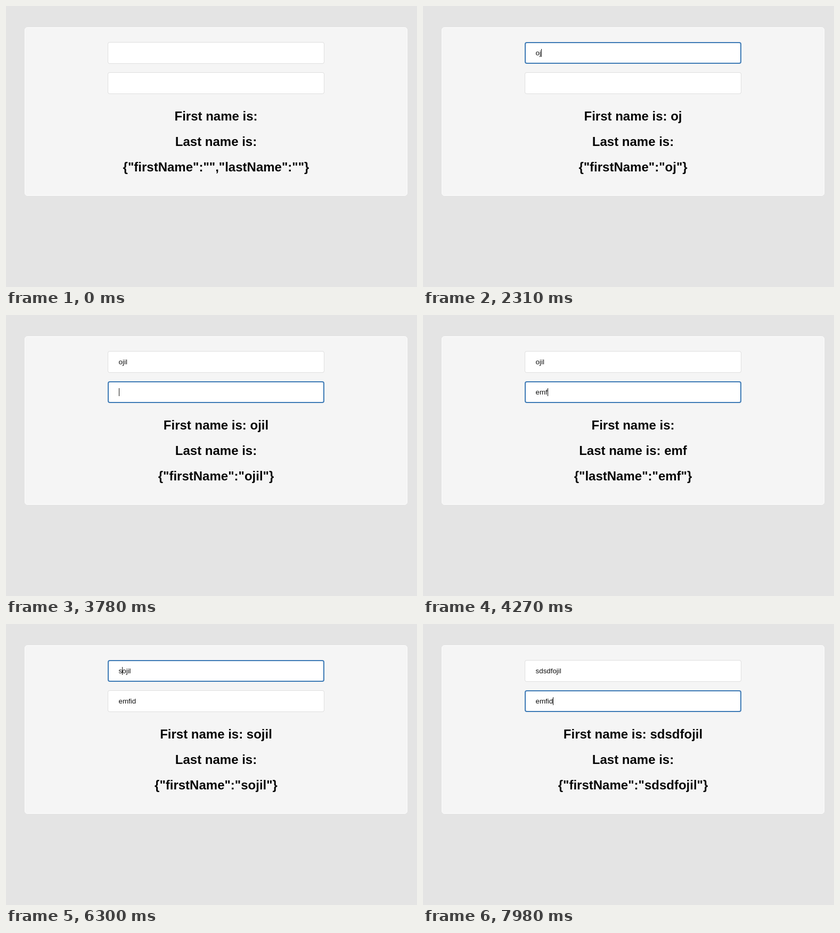
Animation, 772 px wide and 530 px high, one loop 8 s. Source, as an HTML page:

```html
<!DOCTYPE html>
<html lang="en">
<head>
<meta charset="utf-8">
<title>Name form</title>
<style>
html, body {
  margin: 0;
  width: 100%;
  height: 100%;
  overflow: hidden;
  background: #e4e4e4;
  font-family: "Liberation Sans", Arial, sans-serif;
}
body { position: relative; }
div { position: absolute; box-sizing: border-box; white-space: pre; }
.card {
  left: 35px; top: 40px; width: 719px; height: 318px;
  background: #f5f5f5;
  border: 1.5px solid #fdfdfd;
  border-radius: 5px;
}
.field {
  left: 191px; width: 407px; height: 41px;
  background: #fff;
  border-radius: 4px;
  box-shadow: inset 0 0 0 1px #dfdfdf;
}
.field.focus { box-shadow: inset 0 0 0 2px #3d7ab5; }
.value {
  left: 20.6px; top: 13px;
  font-size: 13.333px; line-height: 15px;
  color: #111;
}
.caret { position: relative; }
.caret::after {
  content: "";
  position: absolute;
  left: 0; top: 0;
  width: 1px; height: 15px;
  background: #111;
}
.line {
  left: 35px; width: 719px;
  text-align: center;
  font-weight: bold; font-size: 24px; line-height: 27px;
  color: #050505;
  text-shadow: 0 0 2px #fff;
}
</style>
</head>
<body>
<div class="card"></div>
<div class="field" style="top:68px"><div class="value"><span></span><span></span><span></span></div></div>
<div class="field" style="top:125px"><div class="value"><span></span><span></span><span></span></div></div>
<div class="line" style="top:194px"></div>
<div class="line" style="top:242px"></div>
<div class="line" style="top:290px"></div>
<script>
const LOOP = 8000;
const BLINK = 560;
const KEYS = ['firstName', 'lastName'];
const LABELS = ['First name is:', 'Last name is:'];

// [time, field, text, caret index]
const steps = [
  [980, 0, '', 0],
  [1750, 0, 'o', 1],
  [2030, 0, 'oj', 2],
  [2380, 0, 'oji', 3],
  [2520, 0, 'ojil', 4],
  [3430, 1, '', 0],
  [3850, 1, 'e', 1],
  [4060, 1, 'em', 2],
  [4200, 1, 'emf', 3],
  [4340, 1, 'emfi', 4],
  [4520, 1, 'emfid', 5],
  [5460, 0, 'ojil', 0],
  [6230, 0, 'sojil', 1],
  [6370, 0, 'sdojil', 2],
  [6510, 0, 'sdsojil', 3],
  [6580, 0, 'sdsdojil', 4],
  [6720, 0, 'sdsdfojil', 5],
  [7770, 1, 'emfid', 5]
];

const fields = [...document.querySelectorAll('.field')];
const lines = [...document.querySelectorAll('.line')];

function setText(el, text) {
  if (el.textContent !== text) el.textContent = text;
}

function stateAt(t) {
  const state = { values: ['', ''], model: { firstName: '', lastName: '' }, focus: -1, pos: 0, caret: false };
  for (const [time, field, text, pos] of steps) {
    if (time > t) break;
    // Each edit replaces the whole model with the edited key
    if (text !== state.values[field]) state.model = { [KEYS[field]]: text };
    state.values[field] = text;
    state.focus = field;
    state.pos = pos;
    state.caret = (t - time) % (2 * BLINK) < BLINK;
  }
  return state;
}

function render(t) {
  const { values, model, focus, pos, caret } = stateAt(t);
  fields.forEach((el, i) => {
    const active = i === focus;
    const [before, mark, after] = el.querySelectorAll('span');
    const cut = active ? pos : values[i].length;
    el.classList.toggle('focus', active);
    mark.classList.toggle('caret', active && caret);
    setText(before, values[i].slice(0, cut));
    setText(after, values[i].slice(cut));
  });
  KEYS.forEach((key, i) => setText(lines[i], (LABELS[i] + ' ' + (model[key] || '')).trim()));
  setText(lines[2], JSON.stringify(model));
}

function tick() {
  render(performance.now() % LOOP);
  requestAnimationFrame(tick);
}
tick();
</script>
</body>
</html>
```
